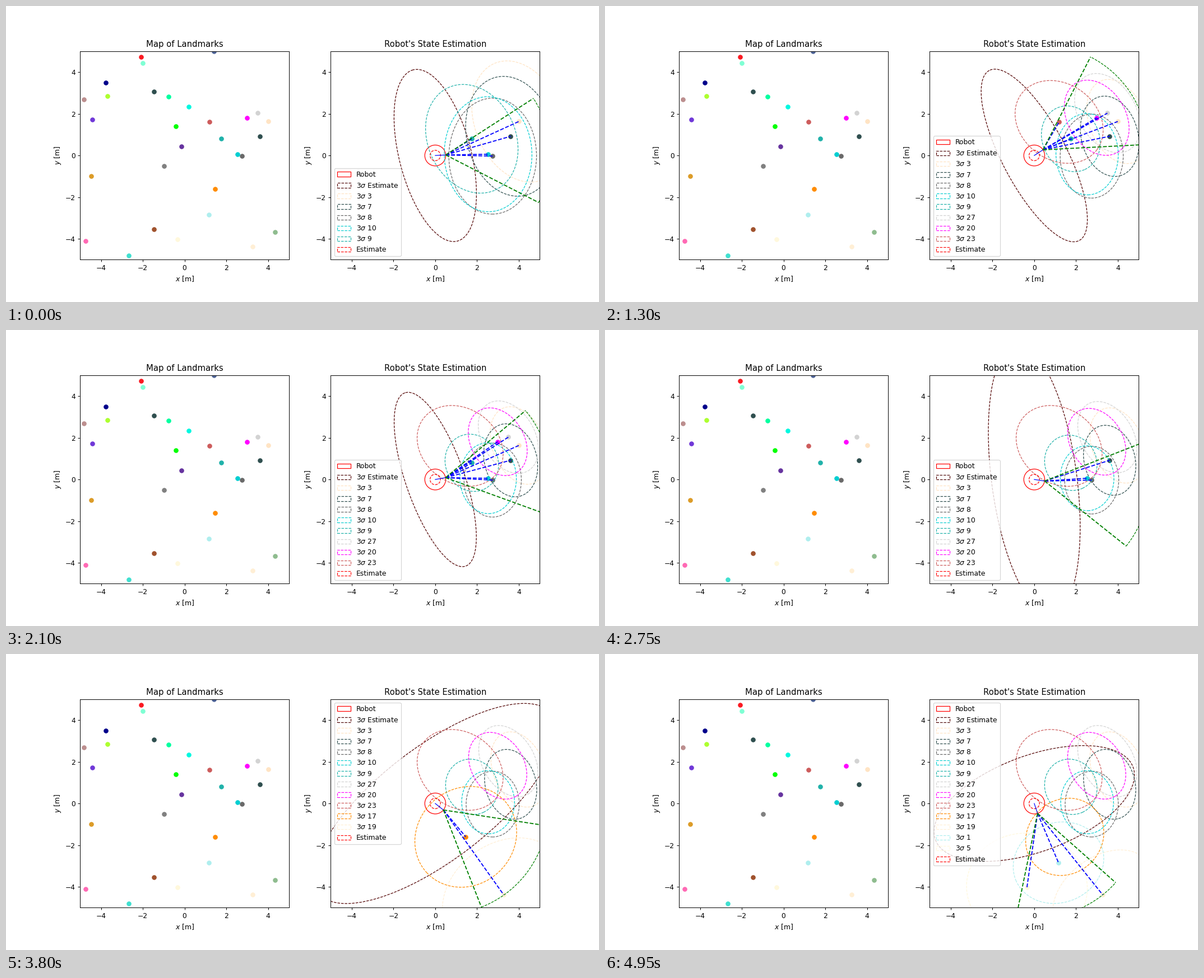
A matplotlib script that plays this animation: 1058x529 px, repeating every 5000 ms.

```python
import numpy as np
import matplotlib.pyplot as plt
from matplotlib.animation import FuncAnimation
from matplotlib.patches import Arc, Circle, Ellipse

FRAMES, INTERVAL = 100, 50
TURN_STEP = 0.025
ARM, REACH, HALF_VIEW = 0.5, 5.0, np.pi / 6
LEGEND_ROWS_BELOW = 11

# Landmarks the robot meets, in order of meeting: id, x, y, colour
TRACKED = [
    (3, 4.0, 1.63, "bisque"), (7, 3.61, 0.92, "darkslategray"), (8, 2.75, -0.03, "dimgray"),
    (10, 2.53, 0.06, "darkturquoise"), (9, 1.75, 0.8, "lightseagreen"),
    (27, 3.5, 2.03, "lightgray"), (20, 2.99, 1.81, "magenta"), (23, 1.19, 1.61, "indianred"),
    (17, 1.46, -1.6, "darkorange"), (19, 3.27, -4.37, "papayawhip"),
    (1, 1.16, -2.84, "paleturquoise"), (5, -0.35, -4.02, "cornsilk"),
]
UNSEEN = [
    (-2.08, 4.72, "#fa1a22"), (-2.0, 4.42, "aquamarine"), (-3.78, 3.49, "darkblue"),
    (-3.69, 2.86, "greenyellow"), (-4.82, 2.69, "rosybrown"), (-4.42, 1.72, "#7038d8"),
    (-1.47, 3.06, "darkslategray"), (-0.77, 2.83, "#00ffa0"), (0.2, 2.33, "#00f8e0"),
    (-0.42, 1.41, "lime"), (-0.15, 0.42, "#66339f"), (-0.98, -0.5, "gray"),
    (-4.47, -0.98, "#dc9c28"), (-1.47, -3.53, "sienna"), (4.33, -3.67, "darkseagreen"),
    (-4.75, -4.1, "hotpink"), (-2.67, -4.79, "turquoise"), (1.4, 4.99, "#53689c"),
]
SPOTS = np.array([row[1:3] for row in TRACKED])


def unit(angle):
    return np.array([np.cos(angle), np.sin(angle)])


def heading(i):
    """Turn left, rest for one step, then turn right."""
    return TURN_STEP * (2 + min(i, 23) - max(0, i - 24))


def sight(i):
    """Distance, bearing and visibility of every tracked landmark."""
    dx, dy = (SPOTS - ARM * unit(heading(i))).T
    dist, bearing = np.hypot(dx, dy), np.arctan2(dy, dx)
    off = (bearing - heading(i) + np.pi) % (2 * np.pi) - np.pi
    return dist, bearing, (dist < REACH) & (abs(off) < HALF_VIEW)


VISIBLE = np.array([sight(i)[2] for i in range(FRAMES)])
FIRST_SEEN = VISIBLE.argmax(axis=0)
# A sighting teaches more when other landmarks are in view at the same time.
WEIGHT = np.minimum(1, VISIBLE.sum(axis=1, keepdims=True) / 6)
LEARNED = np.maximum(0, (VISIBLE * WEIGHT).cumsum(axis=0) - 1)


def radial_variance(i):
    return 1 + (3.4 + 0.03 * FIRST_SEEN) / (1 + 0.12 * LEARNED[i])


def tangential_variance(i):
    dist = np.hypot(*SPOTS.T) - ARM
    return 7 / (1 + 0.08 * LEARNED[i]) + 0.145 * dist ** 2


def pose_covariance(i):
    """Weak prior sharpened along the bearing of each visible landmark."""
    info = np.eye(2) * 0.02 * (1 + np.exp(-i / 4))
    _, bearing, seen = sight(i)
    for angle, variance in zip(bearing[seen], radial_variance(i)[seen]):
        info += np.outer(unit(angle), unit(angle)) / (12 + 0.9 * variance)
    return np.linalg.inv(info)


def sigma_ellipse(center, variances, angle, color, label):
    width, height = 2 * np.sqrt(variances)
    return Ellipse(center, width, height, angle=np.degrees(angle),
                   fill=False, ls="--", ec=color, label=label)


fig, (map_ax, ax) = plt.subplots(1, 2, figsize=(12, 6), dpi=88.167)
for axes, title in ((map_ax, "Map of Landmarks"), (ax, "Robot's State Estimation")):
    axes.set(xlim=(-5, 5), ylim=(-5, 5), aspect="equal", title=title,
             xlabel="$x$ [m]", ylabel="$y$ [m]")
for x, y, color in [row[1:] for row in TRACKED] + UNSEEN:
    map_ax.scatter(x, y, color=color)

artists = []


def update(i):
    while artists:
        artists.pop().remove()
    angle = heading(i)
    eye = ARM * unit(angle)

    def add_patch(patch):
        artists.append(ax.add_patch(patch))

    def add_line(start, end, **style):
        artists.extend(ax.plot(*zip(start, end), **style))

    add_patch(Circle((0, 0), 0.5, fill=False, ec="red", label="Robot"))
    variances, axes = np.linalg.eigh(pose_covariance(i))
    add_patch(sigma_ellipse((0, 0), variances, np.arctan2(axes[1, 0], axes[0, 0]),
                            "#500000", r"3$\sigma$ Estimate"))
    spreads = zip(radial_variance(i), tangential_variance(i))
    for k, ((name, x, y, color), spread) in enumerate(zip(TRACKED, spreads)):
        if i < FIRST_SEEN[k]:
            continue
        add_patch(sigma_ellipse((x, y), spread, np.arctan2(y, x), color, rf"3$\sigma$ {name}"))
        if VISIBLE[i, k]:
            artists.append(ax.scatter(x, y, color=color))
            add_line(eye, (x, y), color="blue", ls="--")
    add_patch(Circle((0, 0), 0.25, fill=False, ls="--", ec="red", label="Estimate"))

    add_line((0, 0), eye, color="blue", lw=1)
    sides = angle - HALF_VIEW, angle + HALF_VIEW
    for side in sides:
        add_line(eye, eye + REACH * unit(side), color="green", ls="--")
    low, high = np.degrees(sides)
    add_patch(Arc(eye, 2 * REACH, 2 * REACH, theta1=low, theta2=high, color="green", ls="--"))

    rows = len(ax.get_legend_handles_labels()[0])
    artists.append(ax.legend(loc="lower left" if rows <= LEGEND_ROWS_BELOW else "upper left"))
    return artists


anim = FuncAnimation(fig, update, frames=FRAMES, interval=INTERVAL,
                     init_func=lambda: [], repeat=True, repeat_delay=0)
plt.show()
```
